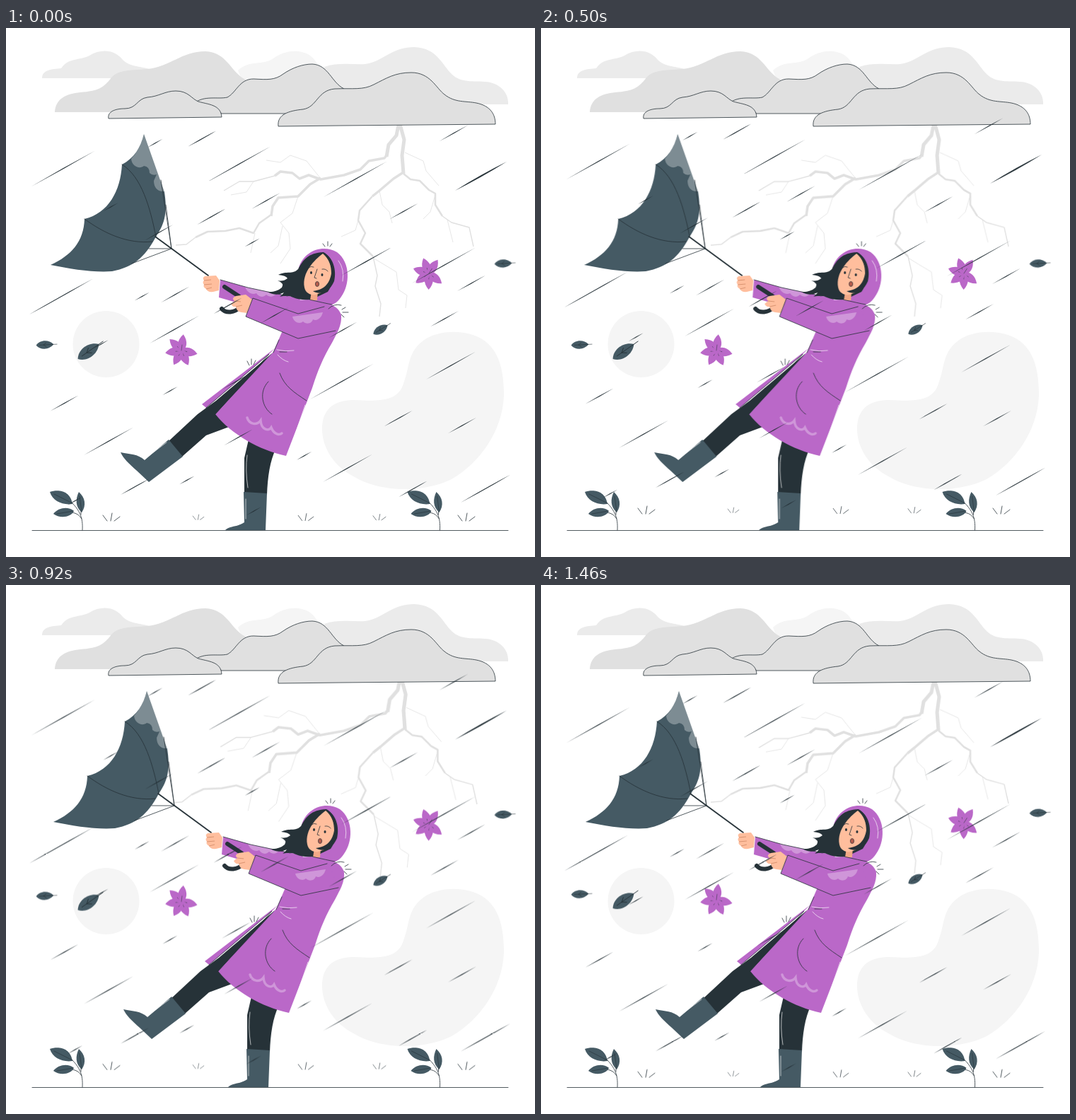
Animation of 748 by 748 pixels, one loop 1500 ms. Source, as an HTML page:

```html
<!DOCTYPE html>
<html lang="en">
<head>
<meta charset="utf-8">
<title>Storm</title>
<style>
  html, body { margin: 0; width: 100%; height: 100%; overflow: hidden; background: #fff; }
  svg { display: block; width: 100%; height: 100%; }
  .line { fill: none; stroke: #263238; stroke-width: .8; stroke-linecap: round; stroke-linejoin: round; }
  .cloud { fill: #e0e0e0; stroke: #263238; stroke-width: .8; }
  .slate { fill: #455a64; }
  .ink { fill: #263238; }
  .coat { fill: #ba68c8; }
  .skin { fill: #ffbe9d; }
  .shine { fill: #fff; opacity: .3; }
  .glint { fill: none; stroke: #fff; stroke-width: .9; stroke-linecap: round; opacity: .75; }
  .knuckle { fill: none; stroke: #c9825f; stroke-width: .7; }
  #bolt { fill: none; stroke: #e0e0e0; stroke-linejoin: round; transform-origin: 484px 273px; }
</style>
</head>
<body>
<svg viewBox="0 0 748 748">
  <defs>
    <g id="leaf">
      <path class="slate" d="M-13 0C-7-8 6-8 13 0C6 8-7 8-13 0Z"/>
      <path class="line" style="stroke-width:.6" d="M-8 0H18M-2 0l4-3M-2 0l4 3"/>
    </g>
    <g id="plant">
      <path class="line" d="M108 710C109 692 105 680 84 663M106 688V668M107 694C101 684 92 684 80 686"/>
      <path class="slate" d="M62 656C74 652 91 654 94 673C80 675 66 669 62 656ZM103 656C112 664 114 675 107 685C98 677 98 666 103 656ZM67 687C74 678 88 676 96 683C92 692 76 694 67 687Z"/>
      <path class="line" style="stroke-width:.6" d="M68 659L94 672M104 662L107 684M72 687L95 683"/>
    </g>
    <path id="tuft" class="line" d="M-12-3l6 8M1-6l-2 11M12-1l-8 6"/>
  </defs>

  <g fill="#f5f5f5">
    <circle cx="141.500" cy="447" r="47"/>
    <path d="M447 567C447 540 462 527 490 526C520 527 550 530 560 508C572 480 566 460 590 442C610 427 650 425 675 441C700 458 704 490 704 520C702 570 670 615 630 638C590 658 530 656 495 636C462 620 447 592 447 567Z"/>
    <path d="M328 60C345 44 362 54 378 43C395 30 418 30 430 39C438 45 441 52 445 60L430 90H340Z"/>
  </g>

  <g id="bolt">
    <path stroke-width="5" d="M556 132L552 152L541 165L538 182M556 132L563 158L560 180L562 206"/>
    <path stroke-width="3.500" d="M540 178L535 184L513 188L501 200L478 208L445 214L428 208L415 213L405 205L388 203L380 209M562 204L548 213L528 230L518 238M445 212L430 221L413 238L385 240L377 252L375 266"/>
    <path stroke-width="2.500" d="M518 238L500 258L498 272L508 290L501 305L519 323M375 264L358 276L350 290L330 283L310 287L285 288L268 296M562 206L572 214L585 216L598 229L607 234L607 250L617 266"/>
    <path stroke-width="1.400" d="M380 209L350 217L330 217L308 230M268 296L255 306L240 307M519 323L525 350L522 365L530 390L528 408M617 266L630 275L655 282L661 309"/>
    <path stroke-width=".8" d="M564 176L590 188L594 202L612 223M528 230L532 250L542 260L546 276M607 236L600 260L590 270M519 325L552 345L555 370L567 378L565 396M498 272L494 286L474 295M445 213L425 188L402 180L388 190L368 187M350 217L340 232L318 236M413 238L405 262L388 275L400 290L402 312L388 333M391 280L385 308L374 318M352 290L346 318M624 271L632 303"/>
  </g>

  <g fill="#ebebeb">
    <path d="M51 71C51 59 65 58 78 57C88 42 104 46 118 39C136 28 155 32 165 45C175 55 190 54 203 58V71Z"/>
    <path d="M450 55C470 48 490 52 508 51C532 48 545 27 577 27C610 28 617 53 630 65C645 80 665 73 685 77C703 82 711 95 710 108H450Z"/>
  </g>
  <path fill="#e0e0e0" d="M69 119C70 100 85 93 105 91C130 89 138 85 149 70C160 58 180 60 200 58C232 55 248 33 282 33C312 34 318 62 337 72L400 119Z"/>
  <path class="cloud" d="M267 106C280 95 300 101 313 98C326 91 330 72 350 72C370 73 380 74 392 65C405 56 420 51 433 51C456 52 460 77 478 86L480 121H305Z"/>
  <path class="cloud" d="M145 128C143 118 155 114 168 114C185 114 185 100 200 98C216 97 225 89 240 89C258 89 262 100 272 104C285 108 304 108 305 126Z"/>
  <path class="cloud" d="M385 139C383 122 400 117 420 115C440 112 440 88 465 86C490 85 505 88 520 80C538 71 550 63 573 63C600 63 608 85 620 94C635 106 650 103 665 106C685 110 692 122 692 136L475 138Z"/>

  <path class="line" d="M37 710.500H710"/>
  <use href="#plant"/>
  <use href="#plant" x="505.500"/>

  <g id="leaves"></g>

  <g id="woman">
    <!-- umbrella -->
    <path class="slate" d="M195 150L224 232C228 258 226 275 212 295C196 325 180 338 150 344C125 346 92 341 63 335C92 322 110 302 111 270C145 262 162 230 164 193C181 184 190 170 195 150Z"/>
    <path class="shine" d="M195 150L224 231C214 232 209 225 209 216L213 207Q207 209 203 205Q203 196 195 195C189 200 178 196 177 185Q190 171 195 150Z"/>
    <path class="line" d="M164 193C192 210 204 255 212 295M111 270C138 290 172 306 207 302M226 250L234 312H202M234 312L178 333M219 215L234 312"/>
    <path class="line" style="stroke-width:1.800" d="M211 295L286 350"/>

    <!-- legs -->
    <path class="ink" d="M376 460L297 527L271 546L228 586L249 606L283 576L318 563L345 525ZM343 582L337 608V660H369C370 635 373 612 382 594Z"/>
    <path class="slate" d="M230 582L250 606L202 642L185 626C174 616 166 609 162 600C176 603 186 602 196 611ZM336 656L369 658L367 710H310C315 704 327 706 337 699Z"/>
    <path class="glint" d="M198 608L227 586M341 604Q338 625 342 650M339 666V694"/>

    <!-- far arm -->
    <path class="coat" d="M303 356L342 367L415 382L423 411L350 395L301 381Z"/>
    <path class="shine" d="M338 366L383 375C377 381 373 381 368 377C363 382 357 380 354 375C348 378 341 374 338 366Z"/>
    <path class="skin" d="M302 357L297 350L281 351Q277 353 280 357Q277 359 280 363Q278 366 283 369Q285 374 293 373L301 371Z"/>
    <path class="knuckle" d="M280 357L290 356M280 363L291 362M283 369L291 367"/>
    <path class="line" d="M303 356L342 367L398 379"/>

    <!-- coat -->
    <path class="coat" d="M277 532L380 453L372 461L283 537Z"/>
    <path class="coat" d="M428 384C452 388 470 391 474 406C475 421 468 431 461 445C448 467 441 484 433 509L396 605C358 597 318 574 296 546L378 458L391 428L408 385Z"/>
    <path class="line" d="M283 537L372 461L296 546M378 459L386 441M387 458H397M371 500C357 514 362 537 376 546M387 488C394 507 407 515 425 527"/>
    <path class="glint" d="M383 455Q395 458 407 456M384 462Q391 470 399 472M423 533L403 592"/>
    <path class="glint" style="stroke-width:3.500;opacity:.3" d="M341 551C344 561 355 562 360 555C361 569 372 570 375 565C379 575 387 576 390 573"/>

    <!-- head -->
    <path class="coat" d="M414 339C421 315 448 305 468 317C488 332 486 364 474 380C467 391 456 396 442 392L432 386Z"/>
    <path class="ink" d="M449 317C427 318 420 328 413 341C405 349 397 343 385 349Q396 350 398 354Q392 359 384 357Q394 361 390 367Q382 374 370 373Q381 380 393 374Q389 379 387 380Q399 377 406 381C415 385 428 385 434 383L455 373C469 354 465 325 449 317Z"/>
    <path fill="#f2a987" d="M432 372L441 371L440 385L430 385Z"/>
    <path class="skin" d="M448 319C436 328 418 346 422 367C424 377 435 379 441 376C452 372 459 366 462 350C461 336 456 326 448 319Z"/>
    <path class="ink" d="M448 318C457 325 460 337 460 347C458 359 452 370 434 372C444 378 457 374 464 358C468 342 462 322 448 318Z"/>
    <ellipse class="ink" cx="431.500" cy="346" rx="1.500" ry="2"/>
    <ellipse class="ink" cx="447" cy="349" rx="1.500" ry="2"/>
    <ellipse cx="440" cy="362" rx="2.600" ry="3.500" fill="#b65d4d" stroke="#263238" stroke-width=".7"/>
    <path class="line" d="M428 339Q431 336 435 338M447 341Q452 340 455 344M440 341L436 353L439 354"/>
    <path class="line" d="M429 384Q450 389 461 391"/>
    <path class="glint" d="M470 329Q479 341 476 358"/>

    <!-- near arm and handle -->
    <path class="line" style="stroke-width:6" d="M309 366L329 379M305 397C311 404 323 403 332 394"/>
    <path class="skin" d="M348 384L339 377L325 379Q318 382 323 386L318 390Q320 395 325 394Q326 401 333 402L341 403Z"/>
    <path class="knuckle" d="M323 386L332 387M325 394L334 392"/>
    <path class="coat" d="M349 382L413 403L450 391L466 428L413 439L339 408Z"/>
    <path class="shine" d="M405 408L448 402C446 410 440 415 434 412C432 419 424 419 420 415C416 419 407 417 405 408Z"/>
    <path class="line" d="M450 394L413 404L349 382L339 408L413 439L466 428M456 397Q464 389 474 392"/>
    <path class="line" d="M448 305l3 4M455 302v6M461 305l-3 4M475 398l5-3M476 402h8M474 405l4 4M341 471l3 6M347 468v8M353 470l-3 6"/>
  </g>

  <g id="rain" class="ink"></g>
</svg>
<script>
const LOOP = 1500, UNIT = 1.496;
const NS = 'http://www.w3.org/2000/svg';
const $ = id => document.getElementById(id);

function add(parent, tag, attrs) {
  const el = document.createElementNS(NS, tag);
  for (const k in attrs) el.setAttribute(k, attrs[k]);
  parent.append(el);
}

let seed = 11;
const random = () => (seed = seed * 16807 % 2147483647) / 2147483647;

// A streak tapers at both ends; taken holds points that later streaks avoid
const SLOPE = .56, taken = [];
function streak(x, y, w, weight = 1.4) {
  const h = w * SLOPE, mx = w / 2, my = h / 2 + weight;
  add($('rain'), 'path', { d: `M${x} ${y}q${mx} ${-my} ${w} ${-h}q${-mx} ${my} ${-w} ${h}z` });
  for (let k = 0; k <= 1; k += .5) taken.push([x + w * k, y - h * k]);
}

const long = {
  90: [[36, 224], [284, 218], [449, 239], [33, 405], [574, 361], [430, 525]],
  70: [[474, 350], [203, 446], [594, 497], [110, 604], [448, 642], [643, 671]]
};
for (const w in long) for (const [x, y] of long[w]) streak(x, y, +w);
streak(635, 230, 73, 2.4);

// Short streaks fill the widest gaps
function gap(x, y) {
  return Math.min(...taken.map(([a, b]) => Math.hypot(a - x, b - y)));
}
for (let i = 0; i < 29; i++) {
  const w = i % 3 ? 40 : 21;
  let best = { room: -1 };
  for (let n = 0; n < 25; n++) {
    const x = 45 + 620 * random(), y = 160 + 530 * random();
    const room = gap(x + w / 2, y - w * SLOPE / 2);
    if (room > best.room) best = { x, y, room };
  }
  streak(best.x, best.y, w);
}

for (const [x, s] of [[149, 1], [272, .65], [424, .9], [528, .75], [651, 1]])
  add($('rain'), 'use', { href: '#tuft', transform: `translate(${x} 692) scale(${s})` });

// Blown leaves and flowers
for (const [x, y, angle, s] of [[703, 333, -3, .95], [55, 448, -3, .95], [116.5, 457.5, -35, 1.4], [529.5, 426.5, -32, .92]])
  add($('leaves'), 'use', { href: '#leaf', transform: `translate(${x} ${y}) rotate(${angle}) scale(${s})` });

function flower(x, y, turn) {
  for (let i = 0; i < 6; i++) {
    const transform = `translate(${x} ${y}) rotate(${turn + i * 53})`;
    add($('leaves'), 'path', { class: 'coat', d: 'M-2 0C4-8 14-8 23 0C14 8 4 8-2 0Z', transform });
    add($('leaves'), 'path', { class: 'line', d: 'M0 0H8', transform, 'stroke-opacity': .6 });
  }
}
flower(598, 347, 38);
flower(248, 456, 12);

// Motion: [time fraction, value] steps
function play(id, steps, css, easing = 'linear') {
  const frames = steps.map(([offset, v]) => ({ offset, transform: css(v), easing }));
  $(id).animate(frames, { duration: LOOP, iterations: Infinity });
}
const moveX = v => `translateX(${v * UNIT}px)`;
const moveY = v => `translateY(${v * UNIT}px)`;

play('woman', [[0, 0], [.1, -1], [.2, 2], [.315, -4], [.4, 4], [.5, -4], [.6, 4], [.7, -4], [.8, 2], [.9, -1], [1, 0]], moveX, 'ease');
play('rain', [[0, 0], [.5, -10], [1, 0]], moveY);
// leaves wait half a second, then are cut off mid-drift by the loop
play('leaves', [[0, 0], [1 / 3, 0], [5 / 6, -10], [1, -20 / 3]], moveY);
play('bolt', [[0, 1], [.19, 1.045], [.333, 1], [.52, 1.05], [.72, 1], [1, 1]], v => `scale(${v})`, 'ease-in-out');
</script>
</body>
</html>
```
